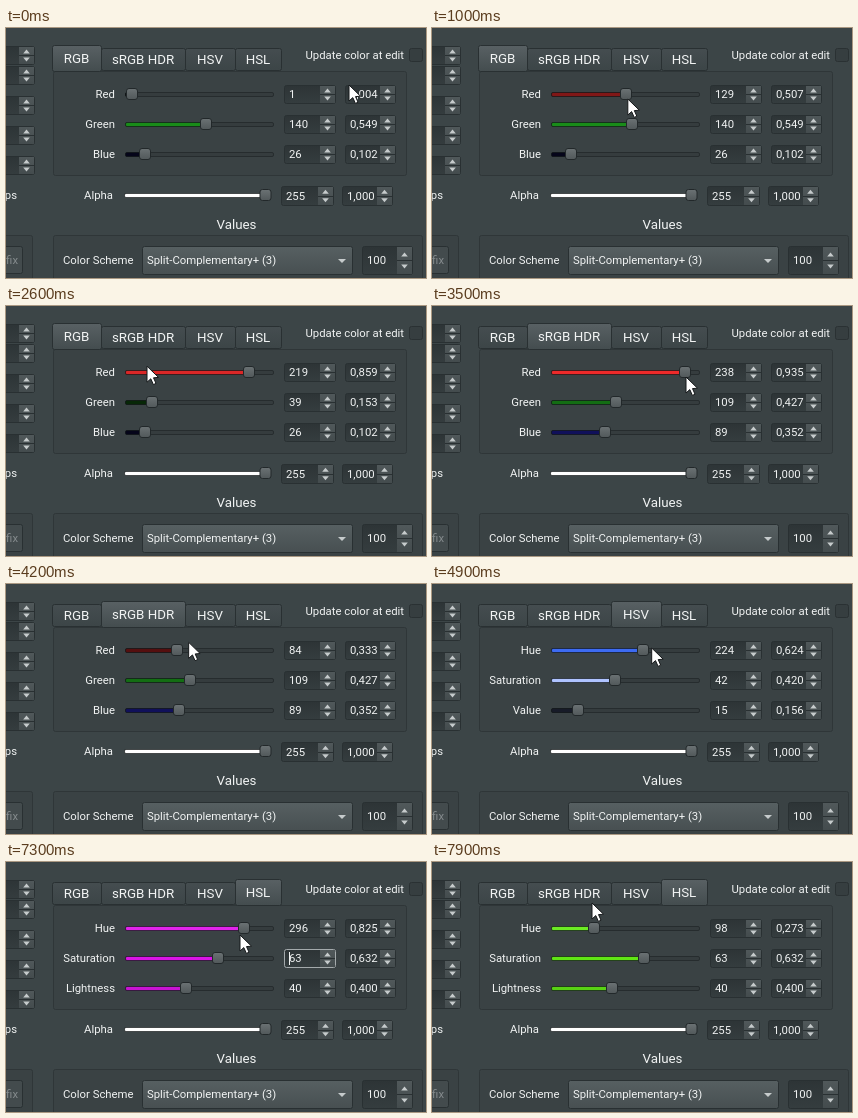
An HTML page with a canvas that plays this animation: 420 by 250 pixels, repeating every 8000 ms.

```html
<!DOCTYPE html>
<html>
<head>
<meta charset="utf-8">
<style>
html, body { margin: 0; width: 100%; height: 100%; overflow: hidden; background: #3c4547; }
canvas { display: block; }
</style>
</head>
<body>
<canvas id="stage" width="420" height="250"></canvas>
<script>
const g = document.getElementById('stage').getContext('2d');
const LOOP = 8000, STEP = 100;
const LINE = '#293032', TEXT = '#f1f3f3';

const rgb = ['Red', 'Green', 'Blue'], cylinder = ['Hue', 'Saturation'];
const TABS = [
  { name: 'RGB', width: 49, labels: rgb, start: [1 / 255, 140 / 255, 26 / 255] },
  { name: 'sRGB HDR', width: 84, labels: rgb, start: [.935, .42746, .352], click: 2800 },
  { name: 'HSV', width: 50, labels: [...cylinder, 'Value'], start: [.362, .42, .156], click: 4400 },
  { name: 'HSL', width: 46, labels: [...cylinder, 'Lightness'], start: [.825, .632, .4], click: 6900 }
];
let edge = 46;
for (const tab of TABS) {
  tab.left = edge;
  edge += tab.width;
}

// Slider drags; grip is the pointer's offset from the knob
const DRAGS = [
  { tab: 0, row: 0, from: 500, until: 1350, to: 219 / 255 },
  { tab: 0, row: 1, from: 1850, until: 2300, to: .153 },
  { tab: 1, row: 0, from: 3500, until: 4100, to: .333 },
  { tab: 2, row: 0, from: 4700, until: 5053, to: .825, grip: [9, -2] },
  { tab: 2, row: 1, from: 5450, until: 5750, to: .78 },
  { tab: 2, row: 2, from: 6200, until: 6550, to: .653 },
  { tab: 3, row: 0, from: 7300, until: 7700, to: .273, grip: [-4, 7] }
];

const rowY = row => 66 + 30 * row;
const knobX = v => Math.round(125 + 137 * v);
const mix = (a, b, p) => a + (b - a) * Math.min(1, Math.max(0, p));

function value(tab, row, t) {
  const d = DRAGS.find(d => d.tab === tab && d.row === row);
  const v = TABS[tab].start[row];
  return d ? mix(v, d.to, (t - d.from) / (d.until - d.from)) : v;
}

// The pointer travels between drags, tab clicks and a few resting points
const STOPS = [[0, 343, 57], [1700, 225, 94], [5800, 219, 106], [7900, 160, 41]];
for (const { tab, row, from, until, grip = [1, 5] } of DRAGS)
  for (const t of [from, until])
    STOPS.push([t, knobX(value(tab, row, t)) + grip[0], rowY(row) + grip[1]]);
for (const { click, left, width } of TABS)
  if (click) STOPS.push([click, left + width / 2, 33]);
STOPS.sort((a, b) => a[0] - b[0]);

function pointerAt(t) {
  const i = Math.max(1, STOPS.findIndex(s => s[0] >= t));
  const [a, b] = [STOPS[i - 1], STOPS[i]];
  const p = (t - a[0]) / (b[0] - a[0]);
  return [mix(a[1], b[1], p), mix(a[2], b[2], p)];
}

function text(s, x, y, size = 11.33, align = 'left', color = TEXT) {
  g.font = size + 'px Roboto, "Open Sans", sans-serif';
  g.textAlign = align;
  g.fillStyle = color;
  g.fillText(s, x, y);
}

function box(x, y, w, h, fill, stroke = LINE, r = 2) {
  g.beginPath();
  g.roundRect(x + .5, y + .5, w - 1, h - 1, r);
  g.fillStyle = fill;
  g.fill();
  g.strokeStyle = stroke;
  g.lineWidth = 1;
  g.stroke();
}

function shade(y, h, top, bottom) {
  const s = g.createLinearGradient(0, y, 0, y + h);
  s.addColorStop(0, top);
  s.addColorStop(1, bottom);
  return s;
}

// Small triangle; d is -1 for up and 1 for down
function arrow(x, y, d, size = 3.3) {
  g.beginPath();
  g.moveTo(x - size, y - d * 2);
  g.lineTo(x + size, y - d * 2);
  g.lineTo(x, y + d * 2);
  g.fillStyle = '#c6cbcc';
  g.fill();
}

function spin(x, y, w, h, label, focus) {
  box(x, y, w, h, shade(y, h, '#2d3436', '#353d3f'), focus ? '#a4aaac' : LINE);
  const bx = x + w - 16, half = h / 2;
  g.fillStyle = shade(y, h, '#51595b', '#434b4d');
  g.fillRect(bx, y + 1, 15, h - 2);
  g.fillStyle = LINE;
  g.fillRect(bx, y + Math.floor(half), 15, 1);
  for (const d of [-1, 1]) arrow(bx + 7.5, y + half + d * h * .21, d);
  text(label, x + 5, Math.floor(y + half + 4));
  if (focus) {
    g.fillStyle = TEXT;
    g.fillRect(x + 5, y + 3, 1, h - 6);
  }
}

function slider(x, end, y, knob, color) {
  box(x, y - 2, end - x, 5, '#353c3e', '#262c2e', 1.5);
  box(x, y - 2, knob - x, 5, color, 'rgba(16,20,22,.6)', 1.5);
  box(knob - 6, y - 6, 12, 12, shade(y - 6, 12, '#6c7375', '#505759'), '#22282a', 2.5);
}

function hsv(h, s, v) {
  const l = v * (1 - s / 2), sl = (v - l) / Math.min(l, 1 - l) || 0;
  return `hsl(${h} ${sl * 100}% ${l * 100}%)`;
}

function tint(tab, row, v) {
  if (tab < 2) return `rgb(${rgb.map((_, i) => v[row] * (i === row ? 255 : 45))})`;
  const h = v[0] * 360;
  if (tab === 2) return [hsv(h, .75, .95), hsv(h, v[1] * .75, 1), hsv(h, v[1], v[2])][row];
  return `hsl(${h} 83% ${53 - 4 * row}%)`;
}

const decimal = v => v.toFixed(3).replace('.', ',');

function whole(tab, row, v) {
  const scale = tab < 2 ? 255 : row ? 100 : 359;
  return String(Math.floor(v * scale + 1e-6));
}

function surroundings() {
  g.fillStyle = '#3c4547';
  g.fillRect(0, 0, 420, 250);
  // Cropped controls at the left
  spin(-26, 18, 55, 19, '');
  for (let i = -1; i < 3; i++) spin(-26, rowY(i) + 2, 55, 19, '');
  text('ps', 11, 171, 11.33, 'right');
  box(-10, 207, 37, 60, '#3a4244', '#2f3638');
  box(-10, 218, 27, 28, '#434b4d');
  text('fix', 12, 236, 11.33, 'right', '#858b8d');

  text('Update color at edit', 398, 31, 11.33, 'right');
  box(403, 20, 14, 14, '#363e40', '#2a3133');
  box(47, 43, 354, 105, '#3a4244', '#2f3638');

  text('Alpha', 107, 171, 11.33, 'right');
  slider(118, 265, 167, 259.5, '#fff');
  spin(275, 158, 53, 20, '255');
  spin(336, 158, 51, 20, '1,000');

  text('Values', 230.5, 201, 13.33, 'center');
  box(47, 207, 370, 60, '#3a4244', '#2f3638');
  text('Color Scheme', 57, 236);
  box(136, 218, 211, 29, shade(218, 29, '#576062', '#474f51'));
  text('Split-Complementary+ (3)', 141, 236);
  arrow(336, 233, 1, 4);
  spin(356, 218, 51, 29, '100');
}

function tabs(active) {
  TABS.forEach(({ name, left, width }, i) => {
    const on = i === active, y = on ? 17 : 20, h = on ? 27 : 23;
    box(left, y, width + 1, h,
      on ? shade(y, h, '#596164', '#434c4e') : shade(y, h, '#454d50', '#3c4547'));
    text(name, left + width / 2, on ? 35 : 36, 13.33, 'center');
  });
}

function pointer(x, y) {
  g.beginPath();
  const shape = [[0, 0], [0, 16], [3.8, 12.6], [6.4, 18.4], [9, 17.2], [6.5, 11.6], [11.5, 11.2]];
  shape.forEach(([dx, dy]) => g.lineTo(x + dx, y + dy));
  g.closePath();
  g.fillStyle = '#fff';
  g.fill();
  g.strokeStyle = '#15181a';
  g.lineWidth = 1;
  g.stroke();
}

function draw(t) {
  const active = TABS.filter(tab => t >= (tab.click || 0)).length - 1;
  const { labels } = TABS[active];
  const values = labels.map((_, row) => value(active, row, t));
  surroundings();
  tabs(active);
  values.forEach((v, row) => {
    const y = rowY(row), focus = active === 3 && row === 1 && t < 7400;
    text(labels[row], 109, y + 4, 11.33, 'right');
    slider(119, 268, y, knobX(v), tint(active, row, values));
    spin(278, y - 9, 52, 19, whole(active, row, v), focus);
    spin(339, y - 9, 51, 19, decimal(v));
  });
  pointer(...pointerAt(t));
}

function tick() {
  draw(Math.floor(performance.now() % LOOP / STEP) * STEP);
  requestAnimationFrame(tick);
}
tick();
</script>
</body>
</html>
```
